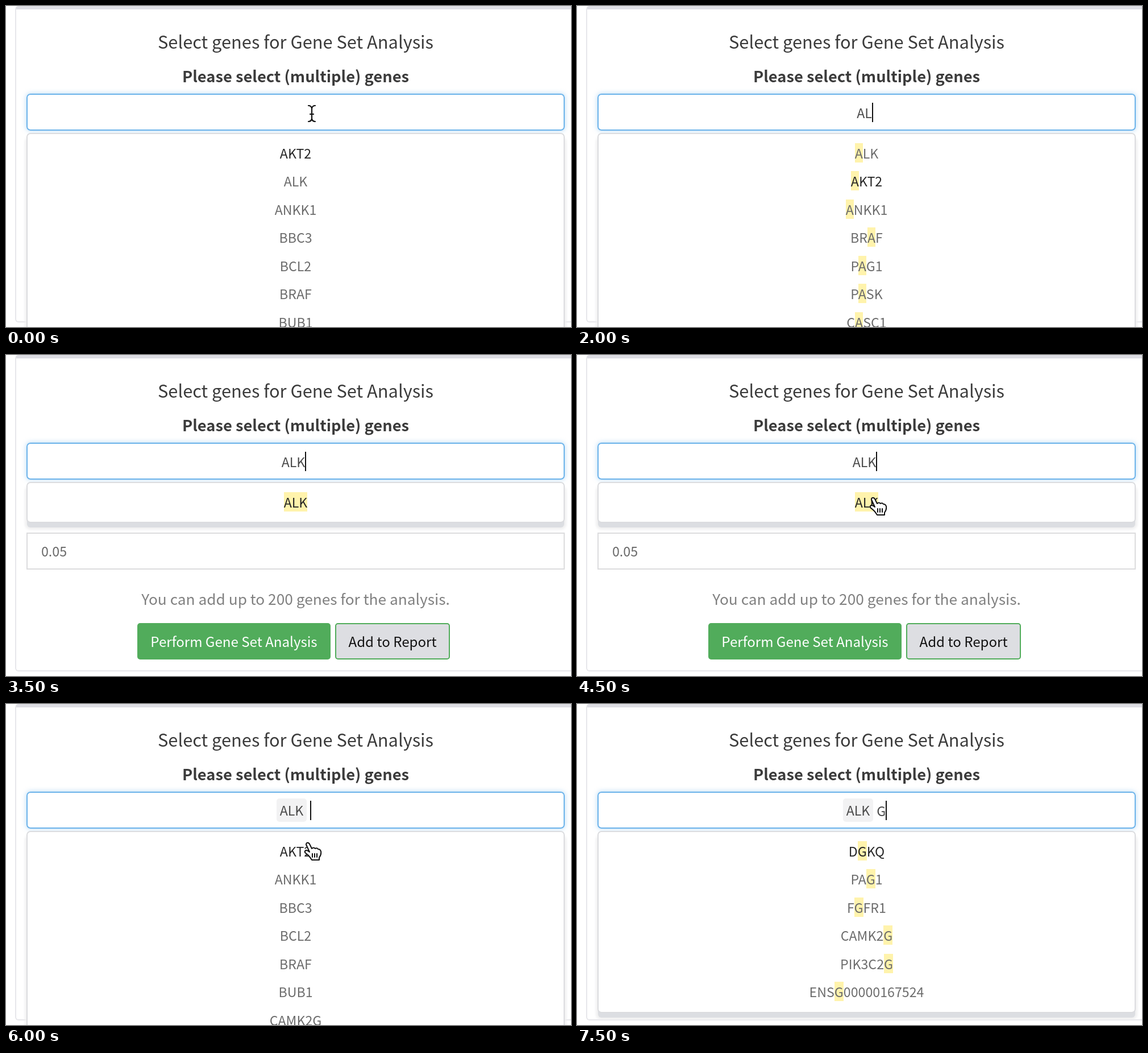
An HTML page that plays this animation: 994x564 px, repeating every 8000 ms.

```html
<!DOCTYPE html>
<html lang="en">
<head>
<meta charset="utf-8">
<title>Gene set selection</title>
<style>
html, body { margin: 0; width: 100%; height: 100%; overflow: hidden; background: #fff; }
body {
  position: relative; color: #3b3b3b; text-align: center; white-space: nowrap;
  font-family: "Noto Sans CJK JP", "Noto Sans CJK SC", "Noto Sans CJK", "Open Sans", sans-serif;
}
body > * { position: absolute; box-sizing: border-box; }
.wide { left: 36px; width: 947px; }
.light { font-weight: 300; font-size: var(--light); }
#panel {
  left: 16px; top: 0; width: 1000px; height: 556px;
  border: 2px solid #e7e7eb; border-top: 6px solid #dddde3; border-radius: 6px;
}
#title { top: 42px; line-height: 40px; font-size: 30.8px; }
#label { top: 102px; line-height: 40px; font-size: 27.3px; font-weight: 700; }
#field {
  top: 154px; height: 65px; border: 2px solid #6cb3ea; border-radius: 7px;
  box-shadow: 0 0 9px rgba(102, 175, 233, .5);
  display: flex; justify-content: center; align-items: center; color: #4a4a4a;
}
.tag { padding: 0 6px; margin-right: 6px; line-height: 41px; border-radius: 5px; background: #f2f2f3; }
.caret { width: 2px; height: 34px; margin-right: 6px; background: #111; }
.caret.off { background: none; }
#cutoff {
  top: 312px; height: 65px; border: 2px solid #dcdcde;
  padding-left: 24px; line-height: 61px; text-align: left; color: #666;
}
#hint { top: 408px; line-height: 41px; font-size: calc(var(--light) * 1.133); color: #808080; }
.button { top: 471px; height: 64px; line-height: 64px; border-radius: 5px; font-size: 24.1px; }
#run { left: 231px; width: 340px; background: #51ac5b; color: #fff; }
#report {
  left: 579px; width: 202px; line-height: 60px;
  border: 2px solid #51ac5b; background: #dddee2; color: #111;
}
#menu {
  top: 223px; padding: 8.75px 0 10px; line-height: 49.5px; color: #6c6c6c;
  border: 2px solid #dbdcdf; border-radius: 7px; background: #fff;
  box-shadow: 0 9px 0 -1px #dcdee2, 0 9px 4px 3px #f0f0f1;
}
#menu .active { color: #262626; }
mark { background: #fff3ac; color: inherit; }
svg { left: 0; top: 0; width: 994px; height: 564px; stroke-linecap: round; stroke-linejoin: round; }
</style>
</head>
<body>
<div id="panel"></div>
<div id="title" class="wide">Select genes for Gene Set Analysis</div>
<div id="label" class="wide">Please select (multiple) genes</div>
<div id="cutoff" class="wide light">0.05</div>
<div id="hint" class="wide light">You can add up to 200 genes for the analysis.</div>
<div id="run" class="button">Perform Gene Set Analysis</div>
<div id="report" class="button">Add to Report</div>
<div id="field" class="wide light"></div>
<div id="menu" class="wide light"></div>
<svg viewBox="0 0 994 564">
  <g id="beam" fill="none">
    <path id="stem" d="M-6-14Q-1-14 0-9V9Q-1 14-6 14M6-14Q1-14 0-9M0 9Q1 14 6 14M-3 1H3" stroke="#fff" stroke-width="5"/>
    <use href="#stem"/>
    <path d="M-6-14Q-1-14 0-9V9Q-1 14-6 14M6-14Q1-14 0-9M0 9Q1 14 6 14M-3 1H3" stroke="#111" stroke-width="2.2"/>
  </g>
  <g id="hand" stroke="#111" stroke-width="2">
    <path d="M-12-11Q-12-15-8-14Q-6-13-5-10L-2-4Q1-7 4-4Q7-6 9-3Q13-3 14 1Q15 7 11 12V16H-2Q-5 11-8 8L-14 3Q-15 0-12-1Q-9-1-6 2Z" fill="#fff"/>
    <path d="M-1 5V11M3 5V11M7 5V11"/>
  </g>
</svg>
<script>
const STEP = 500, LOOP = 8000;
const $ = id => document.getElementById(id);

// Without a light face the regular one is used, which runs slightly wider.
const pen = document.createElement("canvas").getContext("2d");
const measure = weight => {
  pen.font = `${weight} 100px ${getComputedStyle(document.body).fontFamily}`;
  return pen.measureText("genes for the analysis").width;
};
const hasLight = measure(300) < measure(400) - 1;
document.body.style.setProperty("--light", hasLight ? "24px" : "23.2px");

const all = "AKT2 ALK ANKK1 BBC3 BCL2 BRAF BUB1";
const withA = "ALK AKT2 ANKK1 BRAF PAG1 PASK CASC1";
const rest = "AKT2 ANKK1 BBC3 BCL2 BRAF BUB1 CAMK2G";
const withG = "DGKQ PAG1 FGFR1 CAMK2G PIK3C2G ENSG00000167524";

// Each state holds from its start time until the next one.
const states = [
  { at: 0, list: all, typed: "", caretOff: true },
  { at: 500, list: all, typed: "" },
  { at: 1000, list: withA, typed: "A", match: "A", active: 1 },
  { at: 2000, list: withA, typed: "AL", match: "A", active: 1 },
  { at: 2500, list: "ALK", typed: "AL", match: "AL" },
  { at: 3000, list: "ALK", typed: "ALK", match: "ALK" },
  { at: 5000, list: rest, typed: "", tag: "ALK" },
  { at: 7500, list: withG, typed: "G", match: "G", tag: "ALK" }
];

const pointer = [
  { at: 0, pos: [538, 189] },
  { at: 1000 },
  { at: 4000, pos: [533, 258] },
  { at: 4500, pos: [530, 265] },
  { at: 5000, pos: [525, 270] },
  { at: 6000, pos: [540, 258] },
  { at: 6500, pos: [568, 236] },
  { at: 7000, pos: [585, 217] },
  { at: 7500 }
];

const current = (track, t) => track.findLast(entry => entry.at <= t);

function drawState({ list, typed, match, tag, active = 0, caretOff }) {
  $("field").innerHTML = (tag ? `<span class="tag">${tag}</span>` : "") +
    `<span>${typed}</span><span class="caret${caretOff ? " off" : ""}"></span>`;
  $("menu").innerHTML = list.split(" ").map((gene, i) => {
    const text = match ? gene.replace(match, `<mark>${match}</mark>`) : gene;
    return `<div class="${i === active ? "active" : ""}">${text}</div>`;
  }).join("");
}

function drawPointer({ pos }) {
  const overMenu = pos && pos[1] > 223;
  $("beam").style.display = pos && !overMenu ? "" : "none";
  $("hand").style.display = overMenu ? "" : "none";
  if (pos) $(overMenu ? "hand" : "beam").setAttribute("transform", `translate(${pos})`);
}

let shown = -1;
function frame() {
  const t = Math.floor(performance.now() % LOOP / STEP) * STEP;
  if (t !== shown) {
    drawState(current(states, t));
    drawPointer(current(pointer, t));
    shown = t;
  }
  requestAnimationFrame(frame);
}
frame();
</script>
</body>
</html>
```
